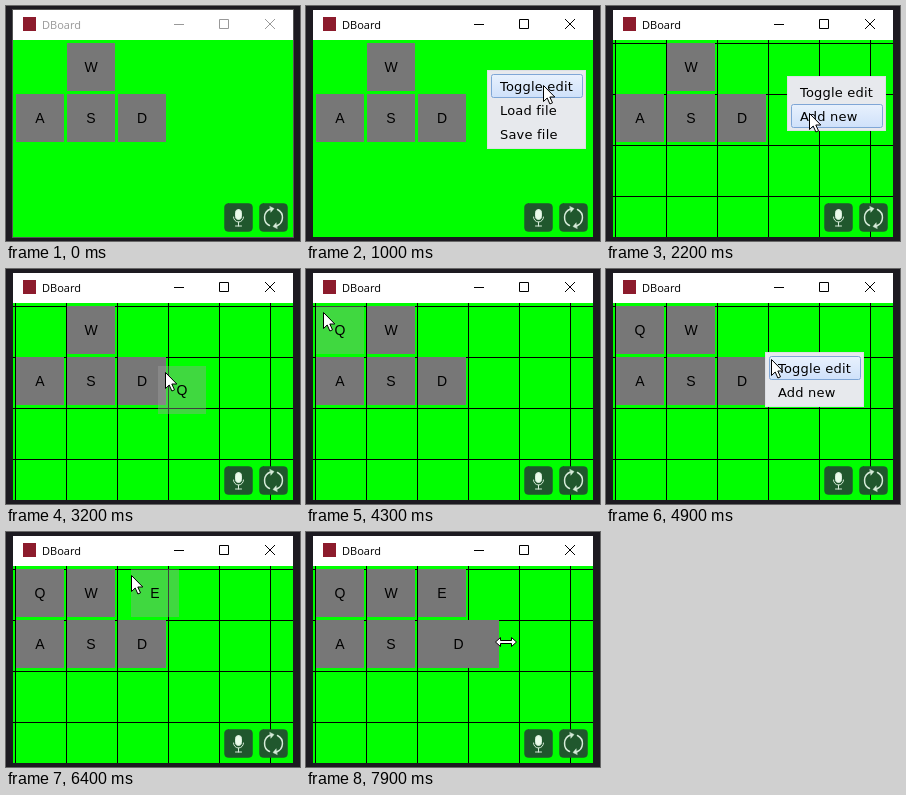
Write an HTML page that moves like this. It is 294 px wide and 235 px high and loops after 8 s.

```html
<!DOCTYPE html>
<html lang="en">
<head>
<meta charset="utf-8">
<title>DBoard</title>
<style>
html, body { margin: 0; width: 100%; height: 100%; overflow: hidden; background: #1c1a20; }
svg { display: block; }
rect, #lines { shape-rendering: crispEdges; }
.soft, .soft rect { shape-rendering: auto; }
.label { font: 14px "Liberation Sans", Arial, sans-serif; text-anchor: middle; }
.item { font: 13px "DejaVu Sans", Verdana, sans-serif; letter-spacing: .2px; }
.title { font: 11px "Open Sans", "Noto Sans", sans-serif; }
</style>
</head>
<body>
<svg width="294" height="235" viewBox="0 0 294 235">
  <defs>
    <linearGradient id="glow" x2="0" y2="1">
      <stop stop-color="#e8f1fd"/><stop offset="1" stop-color="#cfe1fa"/>
    </linearGradient>
    <clipPath id="client"><rect x="7" y="34" width="280" height="197"/></clipPath>
  </defs>

  <rect id="edge" x="6.5" y="3.5" width="281" height="228" fill="#fff" stroke="#555"/>
  <rect x="17" y="11" width="13" height="14" fill="#8c1b2c"/>
  <g id="bar">
    <text class="title" x="36" y="23" fill="currentColor">DBoard</text>
    <path d="M168 18.5h10M213.5 13.5h9v9h-9zM259 13l10 10M269 13l-10 10" fill="none" stroke="currentColor"/>
  </g>

  <rect x="7" y="34" width="280" height="197" fill="#0f0"/>
  <g clip-path="url(#client)">
    <path id="lines" stroke="#000"/>
    <g id="keys"></g>
    <g class="soft" fill="none" stroke="#d5ead8" stroke-linecap="round">
      <g fill="#20572d" stroke="#20572d" stroke-opacity=".5">
        <rect x="218.5" y="197.5" width="28" height="28" rx="4"/>
        <rect x="253.5" y="197.5" width="28" height="28" rx="4"/>
      </g>
      <rect x="229.5" y="203.500" width="6" height="10" rx="3" fill="#eafbea"/>
      <path d="M227.500 211a5 5 0 0 0 10 0M232.500 216v4M229.500 220h6"/>
      <path d="M263.500 219.500a9 9 0 0 1 1-16.500M271.500 203.500a9 9 0 0 1-1 16.500" stroke-width="1.500"/>
      <path d="M264 200.500l4 2-3 3.500zM271 222.500l-4-2 3-3.500z" fill="#d5ead8" stroke-width=".5"/>
    </g>
    <g id="menu">
      <rect id="panel" x=".5" y=".5" width="98" fill="#e7e9ed" stroke="#dcdfe4"/>
      <rect id="hot" class="soft" x="4.5" width="91" height="23" rx="2" fill="url(#glow)" stroke="#7fa6d6"/>
      <g id="items" class="item"></g>
    </g>
  </g>
  <path id="arrow" d="M.5.5v16l3.7-3.5 2.7 6 2.6-1.2-2.7-5.8h5z" fill="#fff" stroke="#000"/>
  <path id="resize" d="M-10.5 0l5-4.500v3h11v-3l5 4.500-5 4.500v-3h-11v3z" fill="#fff" stroke="#000"/>
</svg>
<script>
const LOOP = 8000, STEP = 100, CELL = 51, KEY = 48, LEFT = 10, TOP = 37;
const ACTIVE = 300, EDIT = 1300, RESIZE = 7400;
const $ = id => document.getElementById(id);
const show = (el, on) => el.setAttribute('display', on ? 'inline' : 'none');
const move = (el, [x, y]) => el.setAttribute('transform', `translate(${x} ${y})`);
const cell = (col, row) => [LEFT + col * CELL, TOP + row * CELL];
const snap = ([x, y]) => cell(Math.round((x - LEFT) / CELL), Math.round((y - TOP) / CELL));

// The pointer's gestures: begin, end, destination.
const gestures = [
  [300, 700, 186, 64], [800, 1000, 237, 79], [1300, 1700, 186, 70], [1800, 2000, 203, 107],
  [2400, 2600, 194, 118], [3000, 4000, 17, 43], [4400, 4700, 159, 83], [4800, 5300, 191, 116],
  [5900, 6400, 125, 43], [6700, 7400, 160, 110], [7400, 7900, 200, 110]
];
const menus = [
  { from: 700, to: EDIT, items: ['Toggle edit', 'Load file', 'Save file'] },
  { from: 1700, to: 2400, items: ['Toggle edit', 'Add new'] },
  { from: 4800, to: 5500, items: ['Toggle edit', 'Add new'] }
];
// A new key waits in the first cell, is held at an offset, then snaps to the grid.
const added = [
  { name: 'Q', born: 2400, held: 2600, dropped: 4400, grip: 7 },
  { name: 'E', born: 5500, held: 5900, dropped: 6800, grip: 0 }
];

function pointer(t) {
  let x = 212, y = 118;
  for (const [begin, end, toX, toY] of gestures) {
    const p = Math.min(1, Math.max(0, (t - begin) / (end - begin)));
    x += (toX - x) * p;
    y += (toY - y) * p;
  }
  return [Math.round(x), Math.round(y)];
}

function makeKey(name) {
  const g = document.createElementNS('http://www.w3.org/2000/svg', 'g');
  g.innerHTML = `<rect width="${KEY}" height="${KEY}" fill="#777"/>
    <text class="label" x="24" y="29">${name}</text>`;
  $('keys').append(g);
  return g;
}

const keys = {};
for (const [name, col, row] of [['W', 1, 0], ['A', 0, 1], ['S', 1, 1], ['D', 2, 1]]) {
  keys[name] = makeKey(name);
  move(keys[name], cell(col, row));
}
for (const { name } of added) keys[name] = makeKey(name);

let grid = '';
for (let x = LEFT - .5; x < 287; x += CELL) grid += `M${x} 34V231`;
for (let y = TOP + .5; y < 231; y += CELL) grid += `M7 ${y}H287`;
$('lines').setAttribute('d', grid);

function drawAdded({ name, born, held, dropped, grip }, t) {
  const [box, label] = keys[name].children;
  const [x, y] = pointer(Math.min(t, dropped));
  const spot = [x - grip, y - 6];
  show(keys[name], t >= born);
  show(label, t >= held);
  move(keys[name], t < held ? cell(0, 0) : t < dropped ? spot : snap(spot));
  box.setAttribute('fill', t < dropped ? 'rgba(158,158,158,.404)' : '#777');
}

function drawMenu(t) {
  const m = menus.find(m => t >= m.from && t < m.to);
  show($('menu'), m);
  if (!m) return;
  const [openX, top] = pointer(m.from), left = Math.min(openX, 181);
  const [x, y] = pointer(t), row = Math.floor((y - top - 4) / 24);
  move($('menu'), [left, top]);
  $('panel').setAttribute('height', m.items.length * 24 + 6);
  $('items').innerHTML = m.items.map((s, i) => `<text x="13" y="${21 + i * 24}">${s}</text>`).join('');
  show($('hot'), row >= 0 && x >= left + 4);
  $('hot').setAttribute('y', 4.5 + row * 24);
}

function draw(t) {
  const spot = pointer(t), resizing = t >= RESIZE;
  $('bar').setAttribute('color', t < ACTIVE ? '#999' : '#000');
  $('edge').setAttribute('stroke', t < ACTIVE ? '#555' : '#1c1a20');
  show($('lines'), t >= EDIT);
  added.forEach(key => drawAdded(key, t));

  const width = resizing ? Math.max(KEY, spot[0] - 119) : KEY;
  keys.D.children[0].setAttribute('width', width);
  keys.D.children[1].setAttribute('x', width / 2);

  drawMenu(t);
  show($('arrow'), t >= ACTIVE && !resizing);
  show($('resize'), resizing);
  move($(resizing ? 'resize' : 'arrow'), spot);
}

function frame() {
  const t = performance.now() % LOOP;
  draw(Math.floor(t / STEP) * STEP);
  requestAnimationFrame(frame);
}
frame();
</script>
</body>
</html>
```
